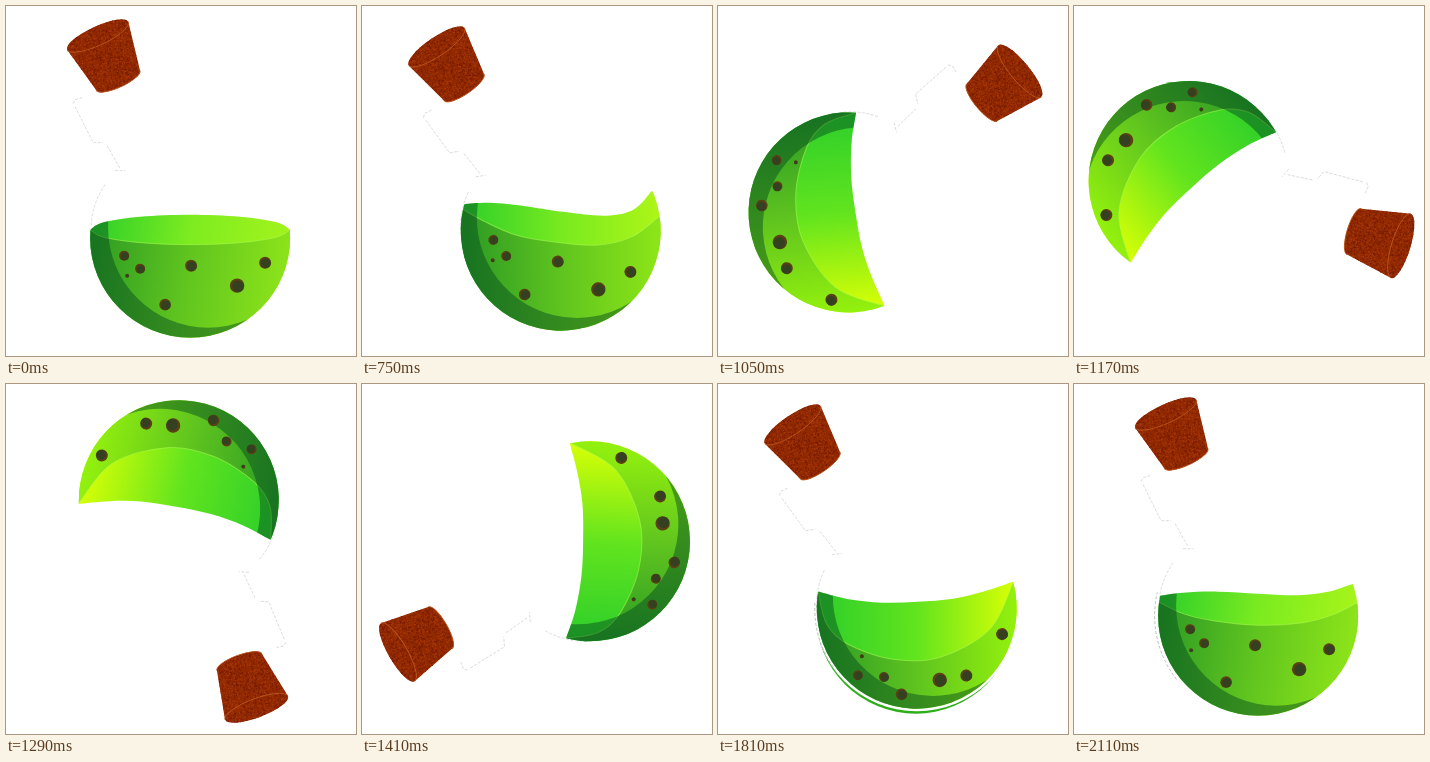
Animation of 350 by 350 pixels, one loop 2210 ms. Source, as an HTML page with a canvas:

```html
<!DOCTYPE html>
<html lang="en">
<head>
<meta charset="utf-8">
<title>Spinning potion</title>
<style>
  html, body { margin: 0; width: 100%; height: 100%; overflow: hidden; background: #fff; }
  canvas { display: block; width: 350px; height: 350px; }
</style>
</head>
<body>
<canvas id="stage" width="350" height="350"></canvas>
<script>
const ctx = document.getElementById('stage').getContext('2d');
const LOOP = 2210, REST = -24.6, R = 100;
const rad = deg => deg * Math.PI / 180;

// Liquid poses, relative to the flask centre while the flask is at rest.
const arc = sign => [0, 30, 60, 90, 120, 150, 180].map(a =>
  [-R * Math.cos(rad(a)), -8 + sign * 15 * Math.sin(rad(a))]);

const rest = {
  back: arc(-1), front: arc(1), hot: 0,
  dots: [[-66, 18], [-50, 31], [-63, 38], [1, 28], [75, 25], [47, 48], [-25, 67]]
};
const slosh = {
  back: [[-91, -42], [-65, -39], [-31, -30], [3, -19], [47, -7.5], [75.5, -9], [96, -24]],
  front: [[-93, -37], [-73, -21], [-45, -3], [-12, 9], [32, 20], [68, 18], [98, 3]],
  dots: [[-68, -2], [-58, 16], [-72, 18], [-8, 30], [62, 52], [27.5, 64], [-46, 57]],
  hot: .2
};
const spin = {
  back: [[-94.5, -33], [-67, -21], [-33, -11.6], [2, -6.7], [37.5, -4], [69, -6], [100, -11]],
  front: [[-94.5, -33], [-91.5, 0], [-74, 23.5], [-32, 46], [16, 51.5], [69, 32], [100, -11]],
  dots: [[-69, 56], [-43.5, 62], [-62, 38], [38, 74], [80, 39], [11, 74], [-29, 82]],
  hot: 1
};
const settle = {
  back: [[-98, -20], [-75, -23], [-40, -24], [0, -22], [40, -20.5], [70, -24], [95, -32]],
  front: [[-100, -14], [-75, -2], [-45, 5], [0, 9.5], [45, 7], [75, -1], [99, -13]],
  dots: [[-68, 13.5], [-54, 27.5], [-67, 34.5], [-3, 29.5], [71, 33.5], [41, 53.5], [-32, 66.5]],
  hot: .1
};
const dotSize = [5, 5, 2, 6, 6, 7.2, 5.8];

const lerp = (a, b, t) => a + (b - a) * t;
const mixPts = (a, b, t) => a.map((p, i) => [lerp(p[0], b[i][0], t), lerp(p[1], b[i][1], t)]);
const mix = (a, b, t) => ({
  back: mixPts(a.back, b.back, t), front: mixPts(a.front, b.front, t),
  dots: mixPts(a.dots, b.dots, t), hot: lerp(a.hot, b.hot, t)
});

// start time, neck tilt, liquid, rim style
const steps = [
  [0, REST, rest], [750, -34, slosh], [810, -42, mix(slosh, spin, .5)],
  [870, -33, spin], [930, -5, spin], [990, 22, spin], [1050, 50.5, spin],
  [1110, 80, spin], [1170, 107, spin], [1230, 133, spin], [1290, 159.5, spin],
  [1350, 203, spin], [1410, 240, spin], [1470, 272, spin], [1530, 298, spin],
  [1590, 319.7, spin], [1650, 335, spin], [1710, 341, spin],
  [1810, 326, spin, 'ring'], [1910, 331, mix(spin, settle, .5)],
  [2010, 360 + REST, mix(spin, settle, .85)], [2110, 360 + REST, settle, 'dash']
];

const cork = { top: -222, topW: 33.6, topH: 9.5, low: -173, lowW: 24, lowH: 7 };

let seed = 7;
const random = () => (seed = (seed * 16807) % 2147483647) / 2147483647;
const grain = Array.from({ length: 1500 }, () => [
  (random() - .5) * 70, lerp(cork.top - 10, cork.low + 8, random()),
  random() < .5 ? '#741900' : '#a8380a'
]);

// Keeps the bounds of the tilted bottle centred on the stage.
function bodyCentre(a) {
  const s = Math.sin(a), c = Math.cos(a), glass = 105;
  const x = -cork.top * s, y = cork.top * c;
  const w = Math.hypot(cork.topW * c, cork.topH * s);
  const h = Math.hypot(cork.topW * s, cork.topH * c);
  const mid = (p, e) => (Math.min(-glass, p - e) + Math.max(glass, p + e)) / 2;
  return [175 - mid(x, w), 175 - mid(y, h)];
}

function curve(p) {
  ctx.lineTo(...p[0]);
  for (let i = 0; i < p.length - 1; i++) {
    const a = p[i - 1] || p[i], b = p[i], c = p[i + 1], d = p[i + 2] || c;
    ctx.bezierCurveTo(b[0] + (c[0] - a[0]) / 6, b[1] + (c[1] - a[1]) / 6,
      c[0] - (d[0] - b[0]) / 6, c[1] - (d[1] - b[1]) / 6, c[0], c[1]);
  }
}

function disc(x, y, r, fill) {
  ctx.beginPath();
  ctx.arc(x, y, r, 0, 7);
  ctx.fillStyle = fill;
  ctx.fill();
}

function below(p) {
  const first = p[0], last = p[p.length - 1];
  ctx.beginPath();
  ctx.moveTo(-130, first[1]);
  curve(p);
  ctx.lineTo(130, last[1]);
  ctx.lineTo(130, 130);
  ctx.lineTo(-130, 130);
  ctx.closePath();
}

function ramp(from, mid, to) {
  const g = ctx.createLinearGradient(-95, -15, 95, 15);
  [from, mid, to].forEach((c, i) => g.addColorStop(i / 2, c));
  return g;
}

const warm = (a, b, t) => `rgb(${a.map((v, i) => Math.round(lerp(v, b[i], t)))})`;

function drawLiquid(pose) {
  ctx.save();
  ctx.beginPath();
  ctx.arc(0, 0, R, 0, 7);
  ctx.clip();
  below(pose.back);
  ctx.clip();
  ctx.fillStyle = ramp('#2fcf2a', warm([126, 236, 32], [98, 228, 30], pose.hot),
    warm([162, 243, 28], [214, 255, 6], pose.hot));
  ctx.fillRect(-R, -R, 2 * R, 2 * R);

  below(pose.front);
  ctx.fillStyle = ramp('#2c9a24', '#5fc41f', warm([138, 226, 26], [146, 240, 14], pose.hot));
  ctx.fill();
  ctx.beginPath();
  curve(pose.front);
  ctx.strokeStyle = 'rgba(170,250,80,.55)';
  ctx.lineWidth = 1;
  ctx.stroke();

  // shaded side of the glass
  ctx.beginPath();
  ctx.rect(-R, -R, 2 * R, 2 * R);
  ctx.arc(18, -10, R, 0, 7);
  ctx.fillStyle = 'rgba(0,70,30,.45)';
  ctx.fill('evenodd');

  pose.dots.forEach(([x, y], i) => {
    const r = dotSize[i];
    disc(x, y, r, '#5c3f12');
    disc(x + r * .12, y + r * .1, r * .8, '#34401f');
  });
  ctx.restore();
}

function drawGlass() {
  ctx.beginPath();
  const line = (...p) => p.forEach(([x, y], i) => i ? ctx.lineTo(x, y) : ctx.moveTo(x, y));
  line([-117, -134], [-115, -138], [-108, -140]);
  line([-115, -131], [-97, -95], [-87, -95]);
  line([-83, -92], [-70, -69]);
  line([-75, -67], [-65, -67]);
  ctx.moveTo(-85, -53);
  ctx.quadraticCurveTo(-98, -34, -99, -12);
  ctx.strokeStyle = '#cfcfcf';
  ctx.lineWidth = .7;
  ctx.setLineDash([3, 1.5]);
  ctx.stroke();
  ctx.setLineDash([]);
}

function drawCork() {
  const { top, topW, topH, low, lowW, lowH } = cork;
  ctx.save();
  ctx.beginPath();
  ctx.ellipse(0, top, topW, topH, 0, Math.PI, 2 * Math.PI);
  ctx.lineTo(lowW, low);
  ctx.ellipse(0, low, lowW, lowH, 0, 0, Math.PI);
  ctx.closePath();
  ctx.clip();
  ctx.fillStyle = '#902800';
  ctx.fillRect(-40, top - 15, 80, 80);
  for (const [x, y, c] of grain) {
    ctx.fillStyle = c;
    ctx.fillRect(x, y, 1.1, 1.1);
  }
  ctx.restore();
  ctx.strokeStyle = '#b9541c';
  ctx.lineWidth = .9;
  ctx.beginPath();
  ctx.ellipse(0, top, topW, topH, 0, 0, Math.PI);
  ctx.stroke();
  ctx.beginPath();
  ctx.ellipse(0, low, lowW, lowH, 0, 0, Math.PI);
  ctx.stroke();
}

function drawRim(style) {
  if (style === 'ring') {
    disc(-1, 5, R, '#2fae1c');
    disc(0, 0, 102.5, '#fff');
  }
  ctx.beginPath();
  if (style === 'ring') ctx.arc(0, 0, 102, rad(145), rad(184));
  else ctx.arc(0, 0, 103.5, rad(142), rad(193));
  ctx.strokeStyle = '#a9b0a9';
  ctx.lineWidth = .8;
  ctx.setLineDash([3, 2]);
  ctx.stroke();
  ctx.setLineDash([]);
}

function draw([, tilt, pose, rim]) {
  const a = rad(tilt);
  ctx.fillStyle = '#fff';
  ctx.fillRect(0, 0, 350, 350);
  ctx.save();
  ctx.translate(...bodyCentre(a));
  if (rim) drawRim(rim);
  ctx.rotate(a);
  drawCork();
  ctx.rotate(rad(-REST));
  drawGlass();
  drawLiquid(pose);
  ctx.restore();
}

const start = performance.now();
let shown;
function tick() {
  const t = (performance.now() - start) % LOOP;
  const step = steps.filter(s => s[0] <= t).pop();
  if (step !== shown) draw(shown = step);
  requestAnimationFrame(tick);
}
tick();
</script>
</body>
</html>
```
